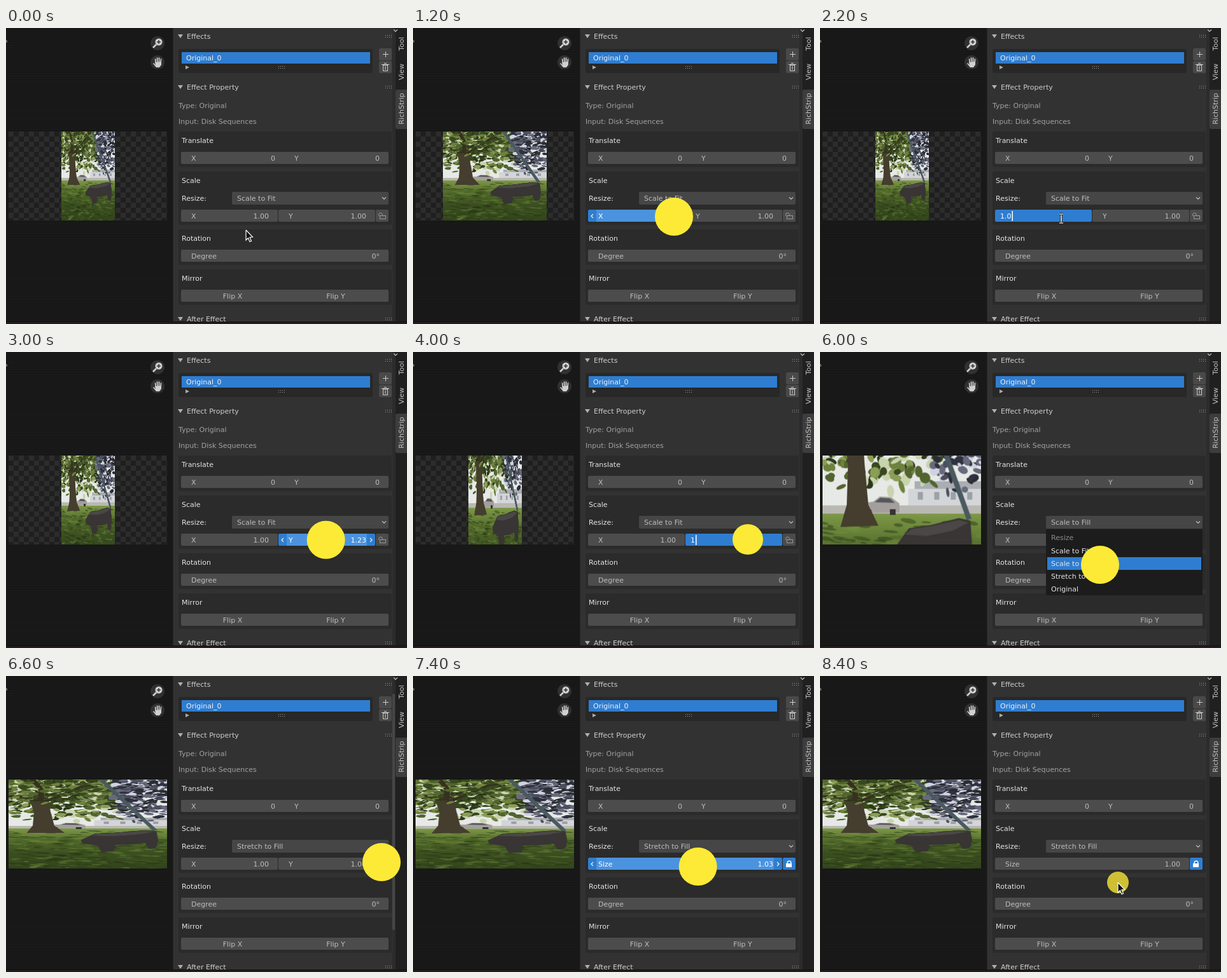
Animation of 630x466 px, one loop 8600 ms. Source, as an HTML page with a canvas:

```html
<!DOCTYPE html>
<html>
<head>
<meta charset="utf-8">
<style>
html, body { margin: 0; width: 100%; height: 100%; overflow: hidden; background: #181818; }
canvas { display: block; }
</style>
</head>
<body>
<canvas id="stage" width="630" height="466"></canvas>
<script>
const STEP = 200, STEPS = 43;
const c = document.getElementById('stage').getContext('2d');
const BLUE = '#2f7dd0', FIELD = '#4c4c4c', LIGHT = '#e4e4e4', SOFT = '#bdbdbd', DIM = '#a2a2a2';

// ---------- helpers ----------
function rect(x, y, w, h, color, g = c) {
  g.fillStyle = color;
  g.fillRect(x, y, w, h);
}
function box(x, y, w, h, r, color) {
  c.fillStyle = color;
  c.beginPath();
  c.roundRect(x, y, w, h, r);
  c.fill();
}
function disc(x, y, r, color) {
  c.fillStyle = color;
  c.beginPath();
  c.arc(x, y, r, 0, 7);
  c.fill();
}
function path(points, g = c) {
  g.beginPath();
  points.forEach(([x, y]) => g.lineTo(x, y));
}
function poly(points, color, g = c) {
  path(points, g);
  g.fillStyle = color;
  g.fill();
}
function line(points, color, width = 1, g = c) {
  path(points, g);
  g.strokeStyle = color;
  g.lineWidth = width;
  g.stroke();
}
function text(s, x, mid, color = SOFT, align = 'left') {
  c.font = '11px "DejaVu Sans", sans-serif';
  c.textAlign = align;
  c.fillStyle = color;
  c.fillText(s, x, mid + 4);
}
// Linear interpolation over rows of [step, value, value, ...]
function track(rows, k) {
  const i = rows.findIndex(r => r[0] > k);
  if (i < 0) return rows[rows.length - 1].slice(1);
  const a = rows[i - 1], b = rows[i], u = (k - a[0]) / (b[0] - a[0]);
  return a.slice(1).map((v, j) => v + (b[j + 1] - v) * u);
}

// ---------- garden picture, painted once ----------
function paintGarden() {
  const cv = document.createElement('canvas');
  cv.width = 250;
  cv.height = 415;
  const g = cv.getContext('2d');
  let seed = 11;
  const rnd = () => (seed = (seed * 16807) % 2147483647) / 2147483647;
  const blobs = (n, place, colors, size, flat = .8) => {
    for (let i = 0; i < n; i++) {
      const [x, y] = place();
      g.fillStyle = colors[Math.floor(rnd() * colors.length)];
      g.beginPath();
      g.ellipse(x, y, size * (.4 + rnd()), size * flat * (.4 + rnd()), rnd() * (flat < .5 ? .2 : 3), 0, 7);
      g.fill();
    }
  };
  rect(0, 0, 250, 415, '#e6e9e6', g);
  rect(145, 178, 105, 12, '#aaaeb3', g);
  rect(135, 190, 115, 30, '#d3d5d8', g);
  for (let x = 150; x < 250; x += 26) rect(x, 195, 8, 12, '#9ba1a8', g);
  rect(0, 216, 250, 18, '#b9b8b2', g);

  const grass = g.createLinearGradient(0, 225, 0, 415);
  grass.addColorStop(0, '#809c49');
  grass.addColorStop(.3, '#556d2c');
  grass.addColorStop(.6, '#3b4f20');
  grass.addColorStop(1, '#33451b');
  rect(0, 229, 250, 186, grass, g);
  blobs(330, () => [rnd() * 250, 240 + rnd() * 175],
    ['#2b3b1877', '#4c632777', '#71904266', '#26341677'], 10, .3);

  poly([[62, 220], [68, 212], [80, 210], [90, 202], [108, 203], [121, 213], [121, 227], [62, 228]], '#a49f9c', g);
  poly([[82, 211], [91, 204], [106, 205], [114, 212]], '#55575a', g);
  rect(68, 223, 9, 9, '#35332f', g);
  rect(106, 222, 9, 9, '#35332f', g);

  rect(0, 0, 165, 100, '#7c8a57', g);
  blobs(650, () => [rnd() * 185, 200 * rnd() * Math.sqrt(rnd())],
    ['#38481f', '#526530', '#6e823e', '#2b371b', '#8b9d56', '#c9d3ae'], 8);
  blobs(300, () => [250 - 85 * rnd(), 205 * rnd() * Math.sqrt(rnd())],
    ['#30323f', '#4b4e5f', '#2a2d32', '#67697c', '#cfd2df'], 7);
  poly([[28, 250], [38, 215], [40, 150], [32, 90], [62, 88], [66, 150], [72, 215], [88, 248]], '#453d2e', g);
  line([[45, 100], [20, 80], [0, 78]], '#36311f', 10, g);
  line([[52, 110], [85, 70], [135, 10]], '#36311f', 9, g);
  line([[50, 100], [52, 50], [38, 0]], '#36311f', 9, g);
  blobs(110, () => [rnd() * 150, rnd() * 120], ['#526530', '#6e823e', '#38481f'], 7);
  line([[144, -5], [231, 238]], '#49595f', 8, g);

  poly([[114, 282], [136, 252], [170, 247], [215, 236], [233, 240], [236, 285], [232, 320], [221, 323],
    [215, 297], [190, 304], [168, 305], [166, 335], [146, 338], [140, 308], [116, 297]], '#383534', g);
  poly([[130, 262], [140, 253], [170, 249], [215, 239], [230, 243], [205, 256], [165, 264]], '#4b4746', g);
  return cv;
}
const garden = paintGarden();

// ---------- timeline: step, pointer x, y, click circle radius ----------
const POINTER = [
  [0, 377, 318, 0], [2, 352, 297, 0], [3, 355, 297, 30], [6, 410, 297, 30], [9, 379, 299, 30],
  [10, 379, 300, 0], [11, 379, 300, 0], [13, 485, 297, 0], [14, 490, 296, 30], [17, 528, 295, 30],
  [18, 526, 295, 0], [19, 526, 295, 30], [20, 526, 295, 24], [21, 526, 295, 0], [22, 480, 268, 30],
  [23, 450, 300, 0], [24, 440, 314, 30], [25, 440, 310, 0], [26, 443, 294, 0], [28, 470, 268, 30],
  [29, 450, 315, 0], [30, 440, 335, 30], [31, 450, 328, 0], [33, 590, 293, 30], [34, 545, 296, 0],
  [35, 434, 299, 0], [36, 434, 300, 30], [39, 475, 300, 30], [41, 455, 302, 30], [42, 468, 325, 17]
];
const SCALE_X = [[0, 1], [3, 1], [6, 1.94], [7, 1.94], [10, 1]];
const SCALE_Y = [[0, 1], [14, 1], [17, 1.7], [20, 1.7], [21, 1]];
const SIZE = [[0, 1], [36, 1], [37, 1.03], [39, 1.12], [41, 1]];
const MODES = ['Scale to Fit', 'Scale to Fill', 'Stretch to Fill', 'Original'];
const EDITS = { 10: ['x', '1'], 11: ['x', '1.0'], 19: ['y', ''], 20: ['y', '1'] };

// ---------- preview ----------
function preview(mode, sx, sy) {
  rect(0, 0, 262, 466, '#181918');
  for (let y = 1; y < 462; y += 4) rect(0, y, 262, 1, '#151615');
  c.save();
  c.beginPath();
  c.rect(4, 163, 249, 140);
  c.clip();
  rect(4, 163, 249, 140, '#1e1f1e');
  for (let j = 0; j < 18; j++)
    for (let i = j % 2; i < 32; i += 2) rect(4 + i * 8, 163 + j * 8, 8, 8, '#2b2c2b');
  const w = (mode ? 249 : 84) * sx, h = (mode === 1 ? 415 : 140) * sy;
  c.drawImage(garden, 128.7 - w / 2, 233 - h / 2, w, h);
  c.restore();

  line([[0, 19], [2, 21], [0, 23]], '#aaa');
  disc(238, 24, 11, '#303130');
  disc(238, 54, 11, '#303130');
  disc(240, 22, 5.5, '#d0d0d0');
  line([[236, 26], [231, 31]], '#d0d0d0', 2.5);
  line([[237, 22], [243, 22]], '#303130', 1.5);
  line([[240, 19], [240, 25]], '#303130', 1.5);
  poly([[234, 54], [244, 53], [244, 58], [241, 62], [236, 62], [231, 56], [232, 55], [235, 58]], '#d0d0d0');
  for (let i = 0; i < 4; i++)
    line([[235.5 + i * 2.5, 56], [234.5 + i * 3, i % 3 ? 46.5 : 48.5]], '#d0d0d0', 1.7);
}

// ---------- side panel ----------
function grip(x, y) {
  for (let i = 0; i < 4; i++) {
    rect(x + i * 3, y - 2, 1, 1, '#999');
    rect(x + i * 3, y + 1, 1, 1, '#999');
  }
}
function header(title, mid) {
  poly([[270, mid - 3], [278, mid - 3], [274, mid + 3]], '#b0b0b0');
  text(title, 284, mid, '#cdcdcd');
  grip(596, mid);
}
function chevron(x, y, color = '#c0c0c0') {
  line([[x - 3, y - 1.5], [x, y + 1.5], [x + 3, y - 1.5]], color, 1.2);
}
function tab(label, mid) {
  c.save();
  c.translate(621, mid);
  c.rotate(-Math.PI / 2);
  text(label, 0, 0, '#c4c4c4', 'center');
  c.restore();
}
function group(title, y, h) {
  box(271, y, 335, h, 3, '#2a2b2a');
  text(title, 276, y + 14, LIGHT);
}
function pair(x, w, mid) {
  box(x, mid - 10, w, 19, 2, FIELD);
}
function panel(mode) {
  rect(262, 0, 350, 466, '#313231');
  rect(262, 0, 1, 466, '#252625');
  rect(607, 0, 5, 466, '#2b2c2b');
  rect(612, 0, 18, 466, '#1f201f');
  box(612, 97, 20, 62, 3, '#3c3d3c');
  tab('Tool', 25);
  tab('View', 69);
  tab('RichStrip', 127);
  chevron(612, 4);

  header('Effects', 13);
  box(271, 33, 305, 38, 3, '#272827');
  rect(276, 38, 296, 18, BLUE);
  text('Original_0', 283, 47, '#f2f2f2');
  poly([[282, 59], [288, 62], [282, 65]], '#aaa');
  grip(428, 62);
  box(586, 32, 20, 19, 2, '#484948');
  box(586, 52, 20, 19, 2, '#484948');
  line([[592, 41.5], [601, 41.5]], '#ccc');
  line([[596.5, 37], [596.5, 46]], '#ccc');
  c.strokeStyle = '#ccc';
  c.strokeRect(592.5, 58.5, 7, 9);
  line([[590, 57.5], [602, 57.5]], '#ccc');
  line([[594, 55.5], [598, 55.5]], '#ccc');
  line([[596, 60], [596, 66]], '#ccc');

  header('Effect Property', 93);
  text('Type: Original', 271, 122, DIM);
  text('Input: Disk Sequences', 271, 147, DIM);

  group('Translate', 163, 56);
  pair(275, 326, 205);
  text('X', 291, 205);
  text('0', 423, 205, SOFT, 'right');
  text('Y', 453, 205);
  text('0', 587, 205, SOFT, 'right');

  group('Scale', 226, 84);
  text('Resize:', 276, 268, LIGHT);
  box(355, 258, 246, 20, 2, '#454645');
  text(MODES[mode], 363, 268);
  chevron(594, 268);

  group('Rotation', 317, 56);
  pair(275, 326, 359);
  text('Degree', 291, 359);
  text('0°', 587, 359, SOFT, 'right');

  group('Mirror', 380, 56);
  pair(275, 326, 422);
  text('Flip X', 356, 422, SOFT, 'center');
  text('Flip Y', 518, 422, SOFT, 'center');
  header('After Effect', 458);
  rect(0, 462, 630, 4, '#151315');
  rect(0, 464, 630, 1, '#3a282c');
}
function numberField(label, value, x, w, { hover, drag, edit }) {
  const on = hover || drag;
  box(x, 286, w, 19, 2, edit !== undefined || drag ? BLUE : on ? '#606160' : FIELD);
  if (edit !== undefined) {
    text(edit, x + 8, 296, '#fff');
    rect(x + 9 + c.measureText(edit).width, 288, 1.5, 16, '#fff');
    return;
  }
  if (on) {
    rect(x + 13, 286, w - 26, 19, drag ? '#4b93df' : '#686968');
    line([[x + 8, 293], [x + 5, 296], [x + 8, 299]], '#eee', 1.3);
    line([[x + w - 8, 293], [x + w - 5, 296], [x + w - 8, 299]], '#eee', 1.3);
  }
  text(label, x + 16, 296, on ? '#fff' : SOFT);
  text(value.toFixed(2), x + w - 14, 296, on ? '#fff' : SOFT, 'right');
}
function lock(closed) {
  box(581, 286, 20, 19, 2, closed ? BLUE : FIELD);
  const color = closed ? '#fff' : '#999', x = closed ? 591 : 588.5;
  c.strokeStyle = color;
  c.lineWidth = closed ? 1.5 : 1;
  c.beginPath();
  c.arc(x, 294, 2.8, Math.PI, 0);
  c.lineTo(x + 2.8, 296);
  c.moveTo(x - 2.8, 294);
  c.lineTo(x - 2.8, 296);
  c.stroke();
  if (closed) rect(586, 295, 9, 6, color);
  else c.strokeRect(587.5, 295.5, 9, 5);
}
function menu(my) {
  box(355, 279, 246, 104, 3, '#1b1c1b');
  text('Resize', 363, 292, '#8c8c8c');
  MODES.forEach((s, i) => {
    const mid = 313 + i * 20;
    if (Math.abs(my - mid) < 10) rect(357, mid - 10, 242, 20, BLUE);
    text(s, 363, mid, LIGHT);
  });
}

// ---------- pointer ----------
function outlined(points, width) {
  line(points, '#222', width + 2);
  line(points, '#fff', width);
}
function pointer(x, y, r, shape) {
  if (r) {
    c.globalAlpha = r < 20 ? .78 : 1;
    disc(x, y, r, '#fdea36');
    c.globalAlpha = 1;
    if (r >= 20) return;
  }
  if (shape === 'beam') {
    outlined([[x, y - 7], [x, y + 7]], 1.5);
    outlined([[x - 3, y - 7], [x + 3, y - 7]], 1.2);
    outlined([[x - 3, y + 7], [x + 3, y + 7]], 1.2);
  } else if (shape === 'slide') {
    outlined([[x - 9, y], [x + 9, y]], 1.5);
    outlined([[x - 6, y - 4], [x - 10, y], [x - 6, y + 4]], 1.5);
    outlined([[x + 6, y - 4], [x + 10, y], [x + 6, y + 4]], 1.5);
  } else {
    const arrow = [[0, 0], [0, 16], [3.5, 12.5], [6, 18.5], [8.5, 17.5], [6, 11.5], [10.5, 11], [0, 0]]
      .map(([a, b]) => [x + a, y + b]);
    poly(arrow, '#111');
    line(arrow, '#fff', 1.2);
  }
}

function draw(k) {
  const [x, y, r] = track(POINTER, k);
  const [sx] = track(SCALE_X, k), [sy] = track(SCALE_Y, k), [size] = track(SIZE, k);
  const mode = k < 25 ? 0 : k < 31 ? 1 : 2, locked = k >= 34;
  const [axis, typed] = EDITS[k] || [];
  const opened = [23, 24, 29, 30].includes(k);
  const over = !opened && y > 286 && y < 305 && x > 275 && x < 580;
  const state = (id, inside) => ({
    hover: over && inside, drag: over && inside && r >= 20, edit: axis === id ? typed : undefined
  });

  preview(mode, sx * size, sy * size);
  panel(mode);
  if (locked) numberField('Size', size, 275, 305, state('size', true));
  else {
    numberField('X', sx, 275, 152, state('x', x < 428));
    numberField('Y', sy, 428, 152, state('y', x >= 428));
  }
  lock(locked);
  if (x > 580) box(607, 28, 4, 372, 2, '#454645');
  if (opened) menu(y);
  pointer(x, y, r, axis ? 'beam' : over ? 'slide' : 'arrow');
}

let shown = -1;
function tick() {
  const k = Math.floor(performance.now() / STEP) % STEPS;
  if (k !== shown) draw(shown = k);
  requestAnimationFrame(tick);
}
tick();
</script>
</body>
</html>
```
